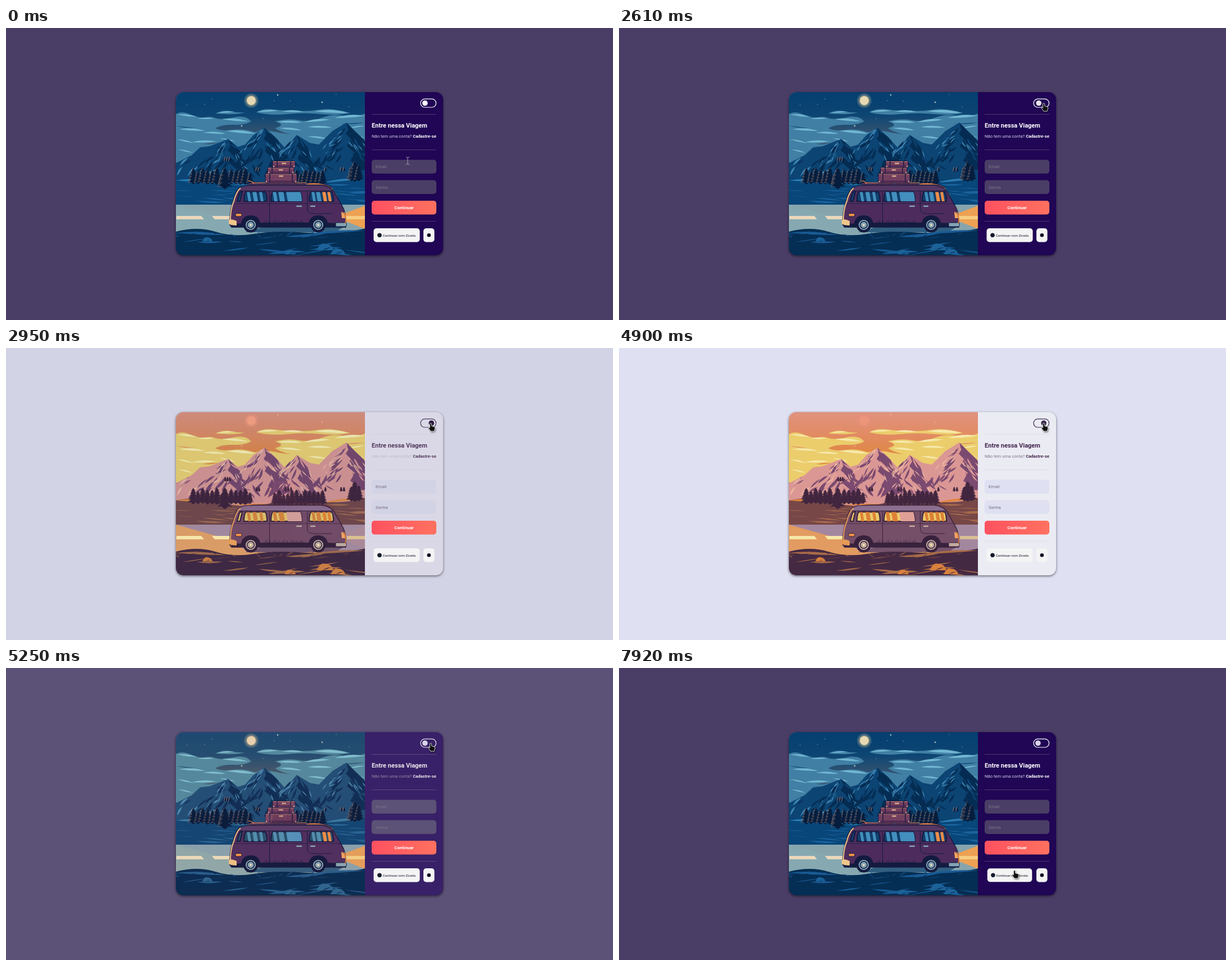
These frames come from a looping animation (1079x519 px, 7.99 s). An HTML page:

```html
<!DOCTYPE html>
<html lang="pt">
<head>
<meta charset="utf-8">
<style>
html, body { margin: 0; width: 100%; height: 100%; overflow: hidden; background: #4b3e66; }
svg { display: block; width: 1079px; height: 519px; font-family: Roboto, Arial, sans-serif; }
</style>
</head>
<body>
<svg id="stage" viewBox="0 0 1079 519"></svg>
<script>
const LOOP = 7990;

const night = {
  id: 'n', sky: ['#053f70', '#0c4573', '#3c566f'], star: '#d8e2d8', moon: '#e6d8b2', halo: '#d9c896',
  cloud: '#417fa4', cloudLit: '#72b7d2', rock: '#0c4473', shade: '#052c52', rockLit: '#3e86b5',
  tree: '#061d3d', treeEdge: '#b38f80', land: '#084679', landLit: '#1c67a2', rim: '#297bb2',
  road: '#86a9b1', roadFar: '#87a4ad', line: '#ead8bc', lineFar: '#f3c57e', shadow: '#315f80',
  front: '#052e54', grass: '#1a5b95', stone: '#1c6299', body: '#4d2c5d', roof: '#543763',
  dark: '#141b40', glass: '#123f6d', blind: '#438fbd', blind2: '#438fbd', edge: '#f0c68a', hub: '#83a5b4'
};
const day = {
  id: 'd', sky: ['#e0927f', '#e28b63', '#e0863f'], star: '#eab090', moon: '#ee967b', halo: '#eb927c',
  cloud: '#ebcd6c', cloudLit: '#f6e9ac', rock: '#db9794', shade: '#7b4a70', rockLit: '#ebb6a0',
  tree: '#42263f', treeEdge: '#42263f', land: '#774748', landLit: '#ad6e4b', rim: '#e18639',
  road: '#e29b60', roadFar: '#a3879f', line: '#f6e7a8', lineFar: '#d9bd94', shadow: '#75536c',
  front: '#442943', grass: '#aa6c46', stone: '#d9803d', body: '#754e68', roof: '#8c6e8f',
  dark: '#38223d', glass: '#ebc969', blind: '#dd8135', blind2: '#dfa096', edge: '#e79a55', hub: '#c2aba0'
};

const path = (d, fill, extra = '') => `<path d="${d}" fill="${fill}" ${extra}/>`;
const line = (d, stroke, w = 1) => path(d, 'none', `stroke="${stroke}" stroke-width="${w}"`);
const rect = (x, y, w, h, fill, r = 0, extra = '') =>
  `<rect x="${x}" y="${y}" width="${w}" height="${h}" rx="${r}" fill="${fill}" ${extra}/>`;
const circle = (x, y, r, fill, extra = '') => `<circle cx="${x}" cy="${y}" r="${r}" fill="${fill}" ${extra}/>`;
const num = v => v.toFixed(1);

// A curved sliver from (x, y) along (dx, dy); b is its bulge relative to its length.
function leaf(x, y, dx, dy, b, fill) {
  const k = b / 3;
  return path(`M${num(x)} ${num(y)}q${num(dx / 2 - dy * b)} ${num(dy / 2 + dx * b)} ${num(dx)} ${num(dy)}` +
    `q${num(-dx / 2 + dy * k)} ${num(-dy / 2 - dx * k)} ${num(-dx)} ${num(-dy)}z`, fill);
}

function seeded(s) {
  return (a = 0, b = 1) => {
    s = (s * 16807) % 2147483647;
    return a + (b - a) * s / 2147483647;
  };
}

function skyArt(c) {
  let s = `<linearGradient id="sky-${c.id}" x2="0" y2="1">` +
    c.sky.map((v, i) => `<stop offset="${i / 2}" stop-color="${v}"/>`).join('') + '</linearGradient>' +
    rect(302, 114, 336, 80, `url(#sky-${c.id})`) + rect(302, 193, 336, 90, c.sky[2]);
  for (const [x, y] of [[322, 137], [366, 126], [353, 136], [477, 129], [505, 130], [587, 118], [610, 140], [457, 161], [485, 147]])
    s += circle(x, y, .6, c.star);
  for (const [x, y] of [[419, 174], [483, 119], [562, 132]])
    s += path(`M${x} ${y - 2}l.6 1.4 1.4.6-1.4.6-.6 1.4-.6-1.4-1.4-.6 1.4-.6z`, c.star);
  s += circle(436, 129, 13, c.halo, 'opacity=".2"') + circle(436, 129, 10.5, c.halo, 'opacity=".3"') + circle(436, 129, 8, c.moon);
  s += path('M302 153Q312 147 326 153T352 160Q362 156 372 160T404 159T436 166Q424 173 404 172T372 178Q382 184 404 181T448 188V250H302Z', c.cloud) +
    path('M478 166Q500 160 520 164T560 160T600 156T638 152V230H500Q520 205 510 190Q490 186 478 178Q500 172 478 166Z', c.cloud) +
    path('M436 187Q460 180 480 185T540 190V230H436Z', c.cloud) +
    path('M445 150Q456 142 478 145T520 148T560 145T612 151Q590 156 560 153T500 153T445 150Z', c.cloud) +
    path('M372 152Q386 145 400 148T425 150Q412 155 372 152Z', c.cloud);
  const lit = [[304, 154, 36, 4], [340, 161, 30, 0], [384, 162, 46, 4], [308, 180, 46, 3], [350, 186, 40, 2],
    [392, 183, 52, 5], [304, 198, 30, 7], [330, 203, 44, -1], [380, 196, 28, 6], [306, 216, 26, 6], [446, 149, 38, -2],
    [490, 148, 40, 1], [548, 148, 60, 3], [376, 151, 30, -2], [482, 167, 44, 1], [530, 167, 46, -4], [584, 160, 54, -4],
    [486, 178, 40, 4], [536, 176, 44, 1], [610, 178, 28, -4], [536, 193, 36, 4], [618, 193, 20, 2]];
  for (const [x, y, dx, dy] of lit) s += leaf(x, y, dx, dy, -.13, c.cloudLit);
  return s + leaf(350, 206, 27, -2, .12, c.sky[2]) + leaf(302, 174, 34, 4, .06, c.sky[1]) + leaf(596, 171, 42, -3, .06, c.sky[1]);
}

function mountainArt(c) {
  const rnd = seeded(73);
  const ridge = 'M302 240L330 226L345 212L362 210L395 197L412 211L425 207L440 190L459 177L478 193L495 212L517 190L540 204L556 207L580 183L605 168L622 185L638 200V285H302Z';
  let s = `<clipPath id="rock-${c.id}"><path d="${ridge}"/></clipPath><g clip-path="url(#rock-${c.id})">` + path(ridge, c.rock);
  for (const [x, y, w] of [[395, 197, 42], [459, 177, 48], [517, 190, 38], [605, 168, 55]]) {
    s += path(`M${x} ${y}l4 12-5 8 9 9-7 13 14 12-8 14 22 17L${x + w} ${y + 78}L${x + w * .6} ${y + 34}L${x + w * .5} ${y + 22}Z`, c.shade);
    for (let i = 0; i < 36; i++) {
      const side = i % 2 ? 1 : -1, down = rnd(4, 66), across = rnd(0, .95) * down;
      s += leaf(x + side * across, y + down, side * rnd(7, 21), rnd(8, 22), side * rnd(.15, .32), i % 4 === 1 ? c.rock : c.shade);
    }
    for (let i = 0; i < 14; i++) {
      const down = rnd(1, 52);
      s += leaf(x - rnd(.25, 1) * down, y + down, -rnd(5, 13), rnd(5, 13), .2, c.rockLit);
    }
    for (let i = 0; i < 6; i++)
      s += leaf(x + rnd(3, 30), y + rnd(22, 58), rnd(4, 12), rnd(8, 15), .18, c.rockLit);
  }
  for (let i = 0; i < 14; i++)
    s += leaf(rnd(304, 380), rnd(222, 258), -rnd(8, 20), rnd(8, 18), rnd(.15, .3), i % 3 ? c.shade : c.rockLit);
  return s + '</g>';
}

function tree(c, x, y, h) {
  const left = [], right = [];
  for (let i = 1; i <= 5; i++) {
    const v = y - h + h * .18 * i, o = h * (.09 + .05 * i);
    for (const [dx, py] of [[o, v], [o * .5, v - 1]]) {
      left.push(`${num(x - dx)} ${num(py)}`);
      right.unshift(`${num(x + dx)} ${num(py)}`);
    }
  }
  const side = `M${x} ${y - h}L${left.join('L')}`;
  return path(`${side}L${x - 1} ${y}H${x + 1}L${right.join('L')}Z`, c.tree) + line(side, c.treeEdge, .5);
}

function landArt(c) {
  const rnd = seeded(411);
  let s = '';
  for (const x of [390, 394, 398, 446, 450, 497, 502, 507, 568, 596, 601]) s += tree(c, x, x < 400 ? 237 : 255, 8);
  s += path('M302 271Q340 262 380 274T470 276T560 272T638 266V320H302Z', c.land);
  s += leaf(302, 271, 52, 1, -.12, c.rim) + leaf(562, 275, 76, -8, -.08, c.rim) + leaf(400, 279, 70, -1, -.05, c.rim);
  for (let i = 0; i < 24; i++) {
    const x = i % 2 ? rnd(295, 390) : rnd(570, 630);
    s += leaf(x, rnd(276, 309), rnd(24, 56), rnd(-4, 5), rnd(-.1, .1), c.landLit);
  }
  for (let i = 0; i < 13; i++) s += tree(c, 333 + i * 8.4, 276 + rnd(0, 4), 20 + rnd(0, 10));
  for (let i = 0; i < 12; i++) s += tree(c, 478 + i * 7.7, 278 + rnd(0, 2), 20 + rnd(0, 10));
  s += tree(c, 389, 286, 38) + tree(c, 614, 272, 26) + tree(c, 620, 273, 36) + tree(c, 627, 272, 28);

  s += rect(302, 314, 336, 62, c.road) + path('M302 314H638V362H430L396 340Z', c.roadFar);
  s += path('M303 334H347L352 340H303ZM366 334H400V340H371Z', c.line) + rect(606, 334, 32, 6, c.lineFar);
  s += path('M425 363L470 350H606L585 363Z', c.shadow);
  if (c === night) s += path('M600 330L638 316V357L600 342Z', '#eda153') + path('M602 334H638V340H602Z', '#f6cd80');
  return s;
}

function frontArt(c) {
  const rnd = seeded(92);
  let s = path('M302 362Q340 352 372 362T440 366T520 363T600 362T638 356V404H302Z', c.front);
  s += leaf(302, 364, 88, 4, -.08, c.grass) + leaf(540, 366, 98, -6, -.06, c.grass);
  for (let i = 0; i < 30; i++) {
    const x = rnd(290, 630), y = rnd(369, 403);
    s += leaf(x, y, rnd(26, 72), rnd(-9, 9), rnd(-.13, .1), i % 4 ? c.grass : c.front);
  }
  for (let i = 0; i < 34; i++) {
    const x = i % 2 ? rnd(304, 385) : rnd(400, 630);
    s += leaf(x, 374 - rnd(0, 7), rnd(-16, 16), -rnd(3, 9), .12, i % 3 ? c.grass : c.front);
  }
  for (const [x, y, r] of [[358, 379, 9], [567, 395, 15], [590, 402, 13], [505, 402, 10]])
    s += path(`M${x - r} ${y}q${r * .5} ${-r} ${r} ${-r * .75}q${r * .8} 0 ${r} ${r * .75}z`, c.stone) +
      leaf(x - r * .3, y, r, -r * .35, -.15, c.front);
  return s;
}

function luggage() {
  const dark = '#191640';
  const suitcase = (x, y, w, h) => rect(x, y, w, h, '#73405f', 1.5, `stroke="${dark}" stroke-width=".9"`) +
    line(`M${x + 1} ${y + 1}h${w - 2}`, '#e2a077', .8) + line(`M${x + 8} ${y}v${h}M${x + w - 8} ${y}v${h}`, dark, 1.5) +
    rect(x + w / 2 - 4, y + 3, 8, 2.5, '#d7a48a', 1) + line(`M${x + 3} ${y + h - 2.5}h${w - 6}`, '#442552', 2) +
    circle(x + 2, y + h - 2, 1.3, '#d8a188') + circle(x + w - 2, y + h - 2, 1.3, '#d8a188');
  return path('M428 278Q440 271 460 276H540Q566 274 579 283Q510 284 428 278Z', '#633757', `stroke="${dark}" stroke-width=".8"`) +
    line('M430 272Q437 271 440 277M438 275H534', '#d98a57', 1.2) +
    path('M533 277Q562 273 580 285L590 300Q577 284 533 280Z', '#ec8c48') +
    suitcase(461, 259, 56, 16) + suitcase(465, 248, 47, 11) + suitcase(474, 236.5, 40, 11.5) +
    line('M446 275V289M490 275V289M534 275V289', '#1d6482', 1.2);
}

function pane(c, x, w, stripes) {
  const id = `pane-${c.id}${x}`, d = `M${x + 3} 291.500H${x + w - 3}Q${x + w} 296 ${x + w} 308H${x}Q${x} 296 ${x + 3} 291.500Z`;
  return `<clipPath id="${id}"><path d="${d}"/></clipPath>` + path(d, c.glass, `stroke="${c.dark}" stroke-width="2"`) +
    `<g clip-path="url(#${id})">` +
    stripes.map(([o, sw, f]) => path(`M${x + o} 291h${sw}l3 18h${-sw}z`, f)).join('') + '</g>';
}

function vanArt(c) {
  const { blind: a, blind2: b } = c;
  const glow = c === night ? '#ee8d48' : a;
  let s = path('M398 350Q397 323 404 308Q408 289 416 284Q424 279.500 450 279H560Q574 280 582 289L599 319Q605 330 604 354H401Z',
    c.body, `stroke="${c.dark}" stroke-width="1.500"`);
  s += path('M410 289Q416 281 430 280.500H560Q574 282 580 289Z', c.roof) + line('M409 289.500H581', c.dark, 1.2);
  s += line('M399 347Q398 323 405 308Q409 291 417 284.500', c.edge, 2);
  s += path('M411 308L415 293Q417 291 420 291L416 308Z', c.glass, `stroke="${c.dark}" stroke-width="2"`);
  s += pane(c, 423, 41, [[5, 5, a], [15, 7, a], [27, 5, a]]);
  s += pane(c, 471, 55, [[3, 6, a], [13, 9, a], [27, 26, b]]);
  s += pane(c, 539, 43, [[4, 5, a], [12, 7, a], [23, 6, glow], [32, 5, glow]]);
  s += line('M405 312H597', c.dark, .7) + line('M468.500 290V348M535.500 290V323Q537 330 547 330H579', c.dark);
  s += rect(516, 315.5, 10, 2.5, c.hub, 1) + rect(541, 315.5, 9, 2.5, c.hub, 1) + rect(408, 329.5, 11, 5.5, '#ee9147', 2, `stroke="${c.dark}"`);
  s += path('M401 348Q500 344 603 347V354H401Z', c.dark);
  for (let i = 0; i < 24; i++) s += line(`M${num(457 + i * 3.1)} 349v${-4 - (i * 7 % 5)}`, c.dark, .8);
  s += path('M396 341Q402 339 410 343V351Q400 351 396 348Z', c.edge) + path('M586 346H604Q607 349 604 353H586Z', c.hub, `stroke="${c.dark}"`);
  s += path('M596 327Q602 327 603 338H597Z', '#f2a35f') + line('M601 327Q606 339 603 348', glow, 1.5);
  for (const x of [435, 555])
    s += path(`M${x - 18} 353Q${x - 17} 333 ${x} 333T${x + 18} 353Z`, c.dark) + circle(x, 350.5, 13, c.dark) +
      circle(x, 350, 9, c.hub) + circle(x, 350, 6.2, c.hub, `stroke="${c.dark}" stroke-width="1.500"`) +
      circle(x, 350, 2, c.line);
  return s;
}

const scene = c => skyArt(c) + mountainArt(c) + landArt(c) + frontArt(c) + (c === night ? luggage() : '') + vanArt(c);

const label = (x, y, size, weight, str, id, fill = '#000', anchor = 'start') =>
  `<text id="${id}" x="${x}" y="${y}" font-size="${size}" font-weight="${weight}" fill="${fill}" text-anchor="${anchor}">${str}</text>`;

const stage = document.getElementById('stage');
stage.innerHTML = `<defs>
<clipPath id="card"><rect x="302" y="114" width="475" height="290" rx="13"/></clipPath>
<linearGradient id="warm"><stop stop-color="#ff5160"/><stop offset="1" stop-color="#ff715f"/></linearGradient>
<filter id="drop" x="-20%" y="-20%" width="140%" height="140%" color-interpolation-filters="sRGB"><feDropShadow dx="0" dy="1.500" stdDeviation="2" flood-opacity=".55"/></filter>
<filter id="soft" x="-50%" y="-50%" width="220%" height="220%" color-interpolation-filters="sRGB"><feDropShadow dx="1" dy="1.500" stdDeviation="1" flood-opacity=".5"/></filter>
</defs>` +
  rect(0, 0, 1079, 519, '#4b3e66', 0, 'id="back"') +
  rect(302, 114, 475, 290, '#200655', 13, 'id="panel" filter="url(#drop)"') +
  `<g clip-path="url(#card)"><svg x="302" y="114" width="336" height="290" viewBox="302 114 336 290">
  ${scene(day)}<g id="night">${scene(night)}</g></svg></g>` +
  rect(737, 126.2, 27.5, 14.8, 'none', 7.4, 'id="track" stroke-width="1.200"') + circle(745, 133.5, 4.8, '#fff', 'id="knob"') +
  '<path id="rules" d="M650 153.500H765M650 216.500H765M650 343.500H765" stroke-width="1"/>' +
  label(650, 176.8, 11.05, 700, 'Entre nessa Viagem', 'title') +
  label(650, 194.6, 7.7, 400, 'Não tem uma conta?', 'ask') +
  label(764.8, 194.6, 7.6, 700, 'Cadastre-se', 'join', '#fff', 'end') +
  rect(650, 234.2, 115, 24.5, '#000', 5, 'id="mail"') + rect(650, 270.5, 115, 24.5, '#000', 5, 'id="pass"') +
  label(657, 249.3, 7.9, 400, 'Email', 'mailHint') + label(657, 285.6, 7.9, 400, 'Senha', 'passHint') +
  '<g id="go">' + rect(650, 307, 115, 24.5, 'url(#warm)', 5) + label(707.5, 322, 7.8, 700, 'Continuar', 'goText', '#fff', 'middle') + '</g>' +
  '<g id="brand">' + rect(653.5, 356, 82, 24.5, '#f4f4f4', 5) + circle(664, 368.2, 3.8, '#151a2c') +
  label(669.7, 370.6, 6, 400, 'Continuar com Zovelu', 'brandText', '#101426') + '</g>' +
  rect(742, 356, 19.5, 24.5, '#f4f4f4', 5) + circle(751.8, 368.2, 3.3, '#0d1024') +
  `<g id="cursor">
  <path d="M-3-6.500Q0-6.500 0-5Q0-6.500 3-6.500M0-5V5M-3 6.500Q0 6.500 0 5Q0 6.500 3 6.500" fill="none" stroke="#a39cae"/>
  <path d="M-1.600.6Q0-1.200 1.600.6V4.500L6.500 6Q8.200 6.800 7.600 9L6 14H0L-4 8.500Q-4.500 6.300-2.800 6.700L-1.600 8Z" fill="#111" stroke="#fff" stroke-width=".8" filter="url(#soft)"/>
  <path d="M0 0V14L4 10 9.500 9Z" fill="#111" stroke="#fff" stroke-width="1" stroke-linejoin="round" filter="url(#soft)"/></g>`;

const $ = {};
stage.querySelectorAll('[id]').forEach(e => $[e.id] = e);
const shapes = [...$.cursor.children];

const clamp = v => Math.max(0, Math.min(1, v));
// cubic-bezier(.25, .1, .25, 1)
function ease(x) {
  x = clamp(x);
  let lo = 0, hi = 1, u = .5;
  for (let i = 0; i < 18; i++) {
    u = (lo + hi) / 2;
    .75 * u * (1 - u) + u ** 3 < x ? lo = u : hi = u;
  }
  return .3 * u * (1 - u) ** 2 + 3 * u * u * (1 - u) + u ** 3;
}
const ramp = (t, on, off, ms) => ease((t - on) / ms) - ease((t - off) / ms);

function mix(a, b, k) {
  const at = (h, i) => parseInt(h.slice(i, i + 2), 16);
  return 'rgb(' + [1, 3, 5].map(i => Math.round(at(a, i) + (at(b, i) - at(a, i)) * k)).join() + ')';
}

// time, x, y of the pointer tip
const route = [[0, 714, 236], [1250, 714, 236], [1500, 738, 208], [1800, 776, 168], [2070, 764, 139], [2210, 755, 134],
  [5460, 755, 134], [5620, 757, 150], [5900, 755, 190], [6270, 733, 226], [6480, 724, 262], [6830, 706, 317],
  [7390, 706, 317], [7640, 706, 342], [7920, 703, 360], [7990, 703, 360]];

function pointer(t) {
  const i = route.findIndex(p => p[0] > t);
  const [t0, x0, y0] = route[i - 1], [t1, x1, y1] = route[i], k = (t - t0) / (t1 - t0);
  return [x0 + (x1 - x0) * k, y0 + (y1 - y0) * k];
}

// index of the pointer shape: text beam, hand or arrow
function shape(x, y) {
  const inside = (l, t, r, b) => x >= l && x <= r && y >= t && y <= b;
  if (inside(650, 234, 765, 259) || inside(650, 270, 765, 295)) return 0;
  if (inside(737, 126, 765, 141) || inside(650, 307, 765, 332) || inside(653, 356, 736, 381) || inside(723, 188, 765, 196)) return 1;
  return 2;
}

const shrink = (el, x, y, k) => el.setAttribute('transform', `translate(${x} ${y}) scale(${1 - .03 * k}) translate(${-x} ${-y})`);

function draw(t) {
  const d = ramp(t, 2625, 4953, 500), slow = ramp(t, 2600, 4900, 1900), slide = ramp(t, 2565, 4860, 400);
  const tint = (a, b) => mix(a, b, d), fill = (id, v) => $[id].setAttribute('fill', v);
  const base = tint('#4b3e66', '#dfe0f2'), ink = tint('#ffffff', '#43274f');
  ['back', 'mail', 'pass'].forEach(id => fill(id, base));
  fill('panel', tint('#200655', '#ebebf3'));
  ['title', 'join'].forEach(id => fill(id, ink));
  ['mailHint', 'passHint'].forEach(id => fill(id, tint('#7c7488', '#77717f')));
  fill('ask', mix('#d3cfe6', '#81758c', slow));
  fill('knob', mix(t < 3500 ? '#ffffff' : '#d7d3e8', '#2b1a3f', slide));
  $.knob.setAttribute('cx', 744.8 + 11.4 * slide);
  $.track.setAttribute('stroke', tint('#ffffff', '#3b2750'));
  $.rules.setAttribute('stroke', tint('#4c3970', '#dedde9'));
  $.night.setAttribute('opacity', 1 - d);
  shrink($.go, 707.5, 319.2, ramp(t, 6730, 7530, 150));
  shrink($.brand, 694.5, 368.2, ramp(t, 7770, 9000, 150));
  const [x, y] = pointer(t), kind = shape(x, y);
  $.cursor.setAttribute('transform', `translate(${num(x)} ${num(y)})`);
  shapes.forEach((e, i) => e.setAttribute('visibility', i === kind ? 'visible' : 'hidden'));
}

const start = performance.now();
function tick() {
  draw((performance.now() - start) % LOOP);
  requestAnimationFrame(tick);
}
draw(0);
requestAnimationFrame(tick);
</script>
</body>
</html>
```
